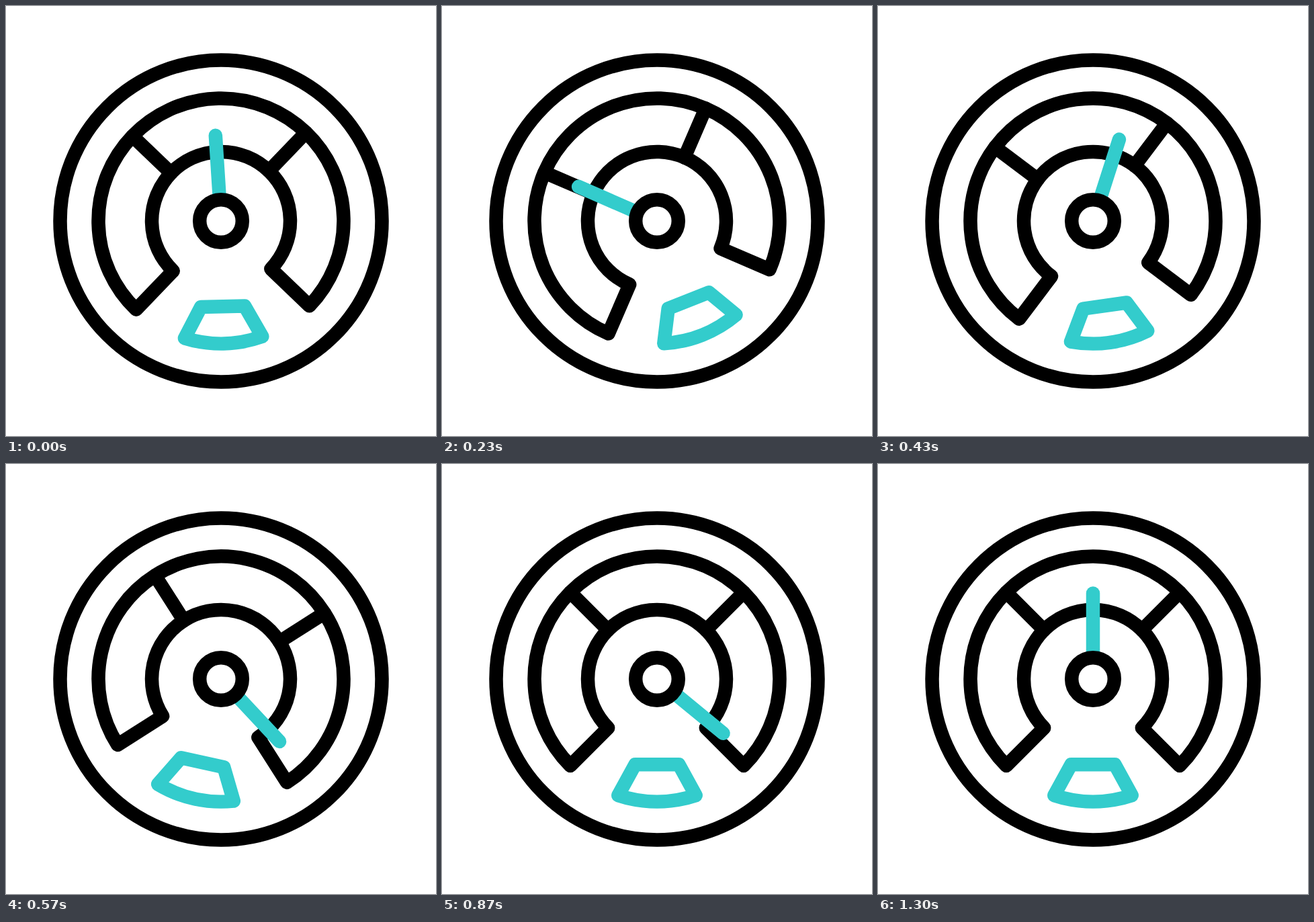
Recreate the animation shown at these times as an HTML page. Size 640 by 640 pixels, loop 1670 ms.

```html
<!DOCTYPE html>
<html lang="en">
<head>
<meta charset="utf-8">
<title>Gauge</title>
<style>
  html, body { margin: 0; width: 100%; height: 100%; overflow: hidden; background: #fff; }
  svg { display: block; width: 100vw; height: 100vh; }
  g { fill: none; stroke: #000; stroke-width: 20.5; stroke-linecap: round; stroke-linejoin: round; }
  .accent { stroke: #3cc; }
</style>
</head>
<body>
<svg viewBox="-320 -320 640 640">
  <g>
    <circle r="239.5"/>
    <g id="dial">
      <path d="M-129 129A182.5 182.5 0 1 1 129 129L72.8 72.8A103 103 0 1 0 -72.8 72.8Z"/>
      <path d="M-72.8 -72.8L-129 -129M72.8 -72.8L129 -129"/>
      <path class="accent" d="M-32.6 127.3H32.6L57.7 173.2A182.5 182.5 0 0 1 -57.7 173.2Z"/>
    </g>
    <path id="needle" class="accent" d="M0 -32V-127.5"/>
    <circle r="31.8" fill="#fff"/>
  </g>
</svg>
<script>
  const LOOP = 1670;

  // [step, angle] keys, eased between neighbours
  const DIAL = [[-1.38, 0], [8.68, -23.4], [18.74, 15.6], [24.8, 0]];
  const NEEDLE = [[-1.38, 0], [8.68, -71.7], [18.74, 154.9], [28.8, 123.4], [38.86, 0]];

  const dial = document.getElementById('dial');
  const needle = document.getElementById('needle');

  function angleAt(keys, step) {
    const i = keys.findIndex(([at]) => at > step);
    if (i < 0) return keys[keys.length - 1][1];
    const [from, a] = keys[i - 1];
    const [to, b] = keys[i];
    const s = (step - from) / (to - from);
    return a + (b - a) * s * s * (3 - 2 * s);
  }

  // Three steps per 100 ms, at 0, 30 and 70
  function stepAt(ms) {
    const rest = ms % 100;
    return 3 * Math.floor(ms / 100) + (rest >= 30) + (rest >= 70);
  }

  const turn = (el, angle) => el.setAttribute('transform', `rotate(${angle.toFixed(3)})`);

  const start = performance.now();

  function draw() {
    const step = stepAt((performance.now() - start) % LOOP);
    turn(dial, angleAt(DIAL, step));
    turn(needle, angleAt(NEEDLE, step));
    requestAnimationFrame(draw);
  }
  draw();
</script>
</body>
</html>
```
